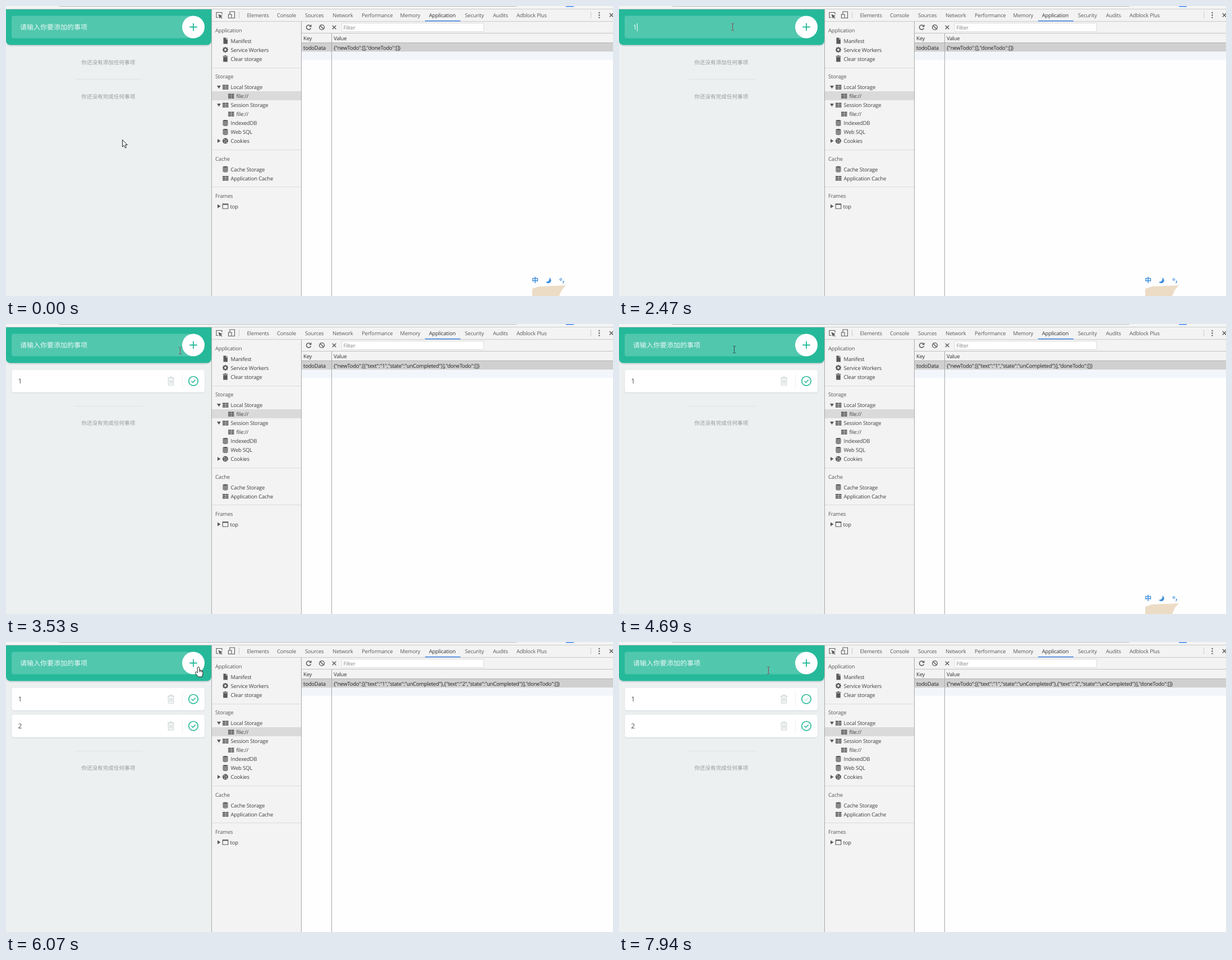
Write an HTML page with a canvas that moves like this. It is 1082x517 px and loops after 8 s.

```html
<!DOCTYPE html>
<html lang="zh">
<head>
<meta charset="utf-8">
<title>Todo</title>
<style>
html, body { margin: 0; width: 100%; height: 100%; overflow: hidden; background: #fff; }
canvas { display: block; width: 1082px; height: 517px; }
</style>
</head>
<body>
<canvas id="stage"></canvas>
<script>
const W = 1082, H = 517, LOOP = 8000;
const TEAL = '#25b99a', ICON = '#5a5a5a', LINE = '#a8a8a8', PANEL = '#f3f3f3';
const UI = '"Open Sans", "Noto Sans", sans-serif';
const CJK = '"Noto Sans CJK SC", "Noto Sans CJK", sans-serif';

const canvas = document.getElementById('stage');
const dpr = window.devicePixelRatio || 1;
canvas.width = W * dpr;
canvas.height = H * dpr;
const c = canvas.getContext('2d');
c.scale(dpr, dpr);

function rect(x, y, w, h, color) {
  c.fillStyle = color;
  c.fillRect(x, y, w, h);
}

function round(x, y, w, h, r, color) {
  c.beginPath();
  c.roundRect(x, y, w, h, r);
  c.fillStyle = color;
  c.fill();
}

function disc(x, y, r, color) {
  c.beginPath();
  c.arc(x, y, r, 0, 7);
  c.fillStyle = color;
  c.fill();
}

function ring(x, y, r, color, width) {
  c.beginPath();
  c.arc(x, y, r, 0, 7);
  stroke(color, width);
}

function stroke(color, width) {
  c.strokeStyle = color;
  c.lineWidth = width;
  c.stroke();
}

// Draws an SVG path whose origin sits at x, y.
function path(x, y, d, color, width, fill) {
  const p = new Path2D(d);
  c.save();
  c.translate(x, y);
  if (fill) {
    c.fillStyle = fill;
    c.fill(p);
  }
  if (width) {
    c.strokeStyle = color;
    c.lineWidth = width;
    c.stroke(p);
  }
  c.restore();
}

function label(str, x, y, color = '#404040', font = '9.5px ' + UI, spacing = -0.2, align = 'left') {
  c.font = font;
  c.letterSpacing = spacing + 'px';
  c.textRendering = 'geometricPrecision';
  c.textAlign = align;
  c.textBaseline = 'alphabetic';
  c.fillStyle = color;
  c.fillText(str, x, y);
}

function shadow(color, blur, dy, draw) {
  c.save();
  c.shadowColor = color;
  c.shadowBlur = blur * dpr;
  c.shadowOffsetY = dy * dpr;
  draw();
  c.restore();
}

// ---- Cursor: stepped moves [start, end, steps, x, y]
const START = [207, 238];
const MOVES = [
  [120, 390, 3, 232, 311],
  [670, 1210, 5, 148, 33],
  [2330, 3120, 7, 336, 48],
  [3530, 4130, 5, 205, 45],
  [5090, 6070, 7, 343, 44],
  [6940, 7210, 3, 276, 108],
  [7360, 7650, 3, 334, 103],
  [7800, 7940, 2, 266, 50]
];

function cursorAt(t) {
  let [x, y] = START;
  for (const [t0, t1, n, tx, ty] of MOVES) {
    if (t < t0) break;
    const done = Math.floor((t - t0) / (t1 - t0) * (n - 1) + 1e-6) + 1;
    const k = Math.min(1, done / n);
    x += (tx - x) * k;
    y += (ty - y) * k;
  }
  return [x, y];
}

function drawCursor(t) {
  const [x, y] = cursorAt(t);
  const onAdd = Math.hypot(x - 334, y - 38) < 20;
  const onCheck = t > 6940 && Math.hypot(x - 334, y - 102) < 12;
  if (onAdd || onCheck) {
    path(x, y, 'M-1.8 1.5Q0-1 1.8 1.5V6L4 6.3 6.3 7.2 8 8.8V13L6.4 18H-.6L-5.4 11.6Q-6 8.2-3.8 9.2L-1.8 11ZM1.8 6V9.5M4 6.3V9.5M6.3 7.2V9.8', '#222', 1, '#fff');
  } else if (y < 57 && x < 340) {
    const color = t > 4000 && t < 5000 ? '#2d4a45' : '#8d4a58';
    path(Math.round(x) + 0.5, Math.round(y) + 0.5, 'M-2.5-6H-.8L0-5.4 .8-6H2.5M0-5.4V5.4M-2.5 6H-.8L0 5.4 .8 6H2.5', color, 1);
  } else {
    path(x, y, 'M.5 .5V13L3.3 10.3 5.4 15 7.5 14.1 5.5 9.5H9.3Z', '#222', 1, '#fff');
  }
}

// ---- State
const within = (t, a, b) => t >= a && t < b;

function stateAt(t) {
  const items = t < 3250 ? [] : t < 6070 ? ['1'] : ['1', '2'];
  return {
    items,
    typed: within(t, 2330, 3250) ? '1' : within(t, 5090, 6070) ? '2' : '',
    caret: [[390, 940], [1490, 1920], [2330, 2850], [4130, 4690], [5090, 5580]]
      .some(([a, b]) => within(t, a, b)),
    ime: t < 3110 || within(t, 4130, 5900),
    focused: within(t, 7210, 7650),
    hover: within(t, 7650, 7800) ? 1 : within(t, 7800, 7940) ? 0.5 : 0,
    fading: t >= 7650
  };
}

// ---- Todo page
function trash(x, y) {
  path(x, y, 'M-6-5H6M-2.3-5V-7.3H2.3V-5M-4.7-5V7.3H4.7V-5M-2.2-2.5V5M0-2.5V5M2.2-2.5V5', '#c3cecd', 1);
}

function check(x, y, fill, pale) {
  c.globalAlpha = fill;
  disc(x, y, 8.2, TEAL);
  c.globalAlpha = 1;
  ring(x, y, 8.2, TEAL, 1.7);
  path(x, y, 'M-3.4 .1L-1 2.5 3.6-2.1', fill ? '#fff' : pale ? '#c5e9e1' : TEAL, 1.5);
}

function drawItem(str, y, focused, hover, pale) {
  const d = focused ? 1 : 0;
  const h = 40 + d * 1.5;
  shadow(focused ? 'rgba(70,140,205,.8)' : 'rgba(44,62,80,.13)', focused ? 4 : 3, 1 - d,
    () => round(10.5, y, 343.5, h, 4, '#fff'));
  if (focused) {
    c.beginPath();
    c.roundRect(10.5, y + 0.5, 343, h - 1, 3);
    stroke('#94bfe2', 1);
  }
  const mid = y + h / 2;
  label(str, 21.5 + d, mid + 4.3, '#494949', '12px ' + UI, 0);
  trash(294 - d, mid);
  rect(314 - d, mid - 13, 1, 26, '#edf0f1');
  check(334 - d, mid, hover, pale);
}

function drawTodo(s) {
  rect(0, 6, 366, H - 6, '#edf0f1');
  shadow('rgba(44,62,80,.2)', 3, 1.5, () => round(0, 6, 366, 63.5, [0, 0, 8, 8], TEAL));
  round(10, 17.5, 340, 40, [4, 20, 20, 4], 'rgba(255,255,255,.2)');
  disc(334, 37.5, 20, '#fff');
  path(334, 37.5, 'M-6.7 0H6.7M0-6.7V6.7', TEAL, 1.8);

  if (s.typed) label(s.typed, 25, 42.2, '#fff', '12px ' + UI, 0);
  else label('请输入你要添加的事项', 25, 42.4, 'rgba(255,255,255,.88)', '12px ' + CJK, 0);
  if (s.caret) rect(s.typed ? 32 : 25, 31, 1, 14, '#fff');

  const hint = (str, y) => label(str, 182.3, y + 3.6, '#999b99', '9.6px ' + CJK, 0, 'center');
  const n = s.items.length;
  const shift = s.focused ? 1.5 : 0;
  s.items.forEach((str, i) => drawItem(str, 81.7 + i * 48 + (i ? shift : 0),
    s.focused && !i, i ? 0 : s.hover, !i && s.fading));
  if (!n) hint('你还没有添加任何事项', 100.5);
  const bar = n ? 98 + n * 48 + shift : 130;
  rect(123, Math.round(bar), 120, 1, '#dee2e3');
  hint('你还没有完成任何事项', bar + (n ? 30.5 : 31));
}

// ---- Developer tools
const icons = {
  doc: (x, y) => path(x, y, 'M-3.5-5.5H1.2V-2.2H4V5.5H-3.5ZM2-5.5L4-3H2Z', '', 0, ICON),
  gear(x, y) {
    for (let i = 0; i < 8; i++) {
      const a = i * Math.PI / 4;
      disc(x + 4.2 * Math.cos(a), y + 4.2 * Math.sin(a), 1.1, ICON);
    }
    ring(x, y, 3, ICON, 2.2);
  },
  bin: (x, y) => path(x, y, 'M-4.5-5H-1.5V-6H1.5V-5H4.5V-3.8H-4.5ZM-3.8-3H3.8V5.5H-3.8Z', '', 0, ICON),
  grid(x, y) {
    for (let i = 0; i < 6; i++) rect(x - 5 + (i % 2) * 5.5, y - 4 + (i >> 1) * 3, 5, 2.3, ICON);
  },
  db(x, y) {
    path(x, y, 'M-4.6-3.6Q-4.6-5.4 0-5.4T4.6-3.6V3.6Q4.6 5.4 0 5.4T-4.6 3.6Z', '', 0, ICON);
    for (let i = 0; i < 3; i++) path(x, y - 2.9 + i * 2.6, 'M-4.6 0Q-3 1.2 0 1.2T4.6 0', PANEL, 0.8);
  },
  cookie(x, y) {
    disc(x, y, 5, ICON);
    [[-2, -2], [1.5, -1], [-1, 2], [2.5, 2.3], [4, -4]].forEach(([a, b]) => disc(x + a, y + b, 0.9, PANEL));
  },
  frame(x, y) {
    path(x, y, 'M-4.8-4H4.8V4.2H-4.8Z', ICON, 1.1);
    rect(x - 5, y - 4.5, 10, 2, ICON);
  }
};

const TABS = { Elements: 429.5, Console: 483, Sources: 533, Network: 582, Performance: 634, Memory: 702.5,
  Application: 754, Security: 818, Audits: 868, 'Adblock Plus': 910 };
const SECTIONS = { Application: 43, Storage: 125.5, Cache: 272, Frames: 338 };

// [text, y, icon, indent, arrow]
const TREE = [
  ['Manifest', 62, 'doc', 0], ['Service Workers', 78, 'gear', 0], ['Clear storage', 94, 'bin', 0],
  ['Local Storage', 144.5, 'grid', 0, 'down'], ['file://', 160.5, 'grid', 10],
  ['Session Storage', 176.5, 'grid', 0, 'down'], ['file://', 192.5, 'grid', 10],
  ['IndexedDB', 208.5, 'db', 0], ['Web SQL', 224.5, 'db', 0], ['Cookies', 240.5, 'cookie', 0, 'right'],
  ['Cache Storage', 291, 'db', 0], ['Application Cache', 307, 'grid', 0], ['top', 357, 'frame', -1, 'right']
];

const ARROWS = { down: 'M-3.5-2.5H3.5L0 3Z', right: 'M-2.5-3.5L3 0-2.5 3.5Z' };

function drawToolbar() {
  rect(0, 0, W, 5, '#f4f4f4');
  rect(95, 0, 815, 1, '#bcbcbc');
  rect(998, 0, 14, 1.5, '#4285f4');
  rect(366, 5, W - 366, H - 5, PANEL);
  rect(0, 5, W, 1, '#c9cccb');
  rect(366, 27, W - 366, 1, '#cacaca');

  path(380, 16, 'M5-1V-4.5H-5V4.5H-1.5', ICON, 1.1);
  path(380, 16, 'M-1.5-1.5L6 1.8 3 3 5.6 5.6 4.4 6.6 2 4.2 .8 6.6Z', '', 0, ICON);
  path(402, 16, 'M-3-1V-6H5.5V5.5H1M-5.5-1H0V5.5H-5.5Z', ICON, 1.1);
  rect(415, 10, 1, 12, '#ccc');
  for (const name in TABS) label(name, TABS[name], 20, name === 'Application' ? '#333' : ICON);
  rect(747, 25.8, 63, 1.6, '#4285e0');
  rect(1042, 10, 1, 12, '#ccc');
  for (const y of [12, 16.3, 20.6]) disc(1057.5, y, 1.2, ICON);
  path(1079, 16.3, 'M-3.2-3.2L3.2 3.2M3.2-3.2L-3.2 3.2', ICON, 1.4);
}

function drawSidebar() {
  rect(366, 6, 1, H, LINE);
  for (const y of [110, 256, 322]) rect(367, y, 159, 1, '#dcdcdc');
  rect(367, 152, 159, 16, '#dadada');
  for (const name in SECTIONS) label(name, 373, SECTIONS[name] + 3.5, ICON);
  for (const [str, y, icon, indent, arrow] of TREE) {
    icons[icon](391 + Math.max(indent, 0), y);
    label(str, 400.5 + indent, y + 3.5);
    if (arrow) path(379.5, y, ARROWS[arrow], '', 0, ICON);
  }
  rect(526, 28, 1, H, LINE);
}

function drawTable(items) {
  c.beginPath();
  c.arc(539.5, 38, 4, 0.3, 5.5);
  stroke(ICON, 1.5);
  path(539.5, 38, 'M5-5.2V-.8H.6Z', '', 0, ICON);
  ring(563, 38, 4.4, ICON, 1.4);
  path(563, 38, 'M-3-3L3 3', ICON, 1.4);
  path(585, 38, 'M-3.3-3.3L3.3 3.3M3.3-3.3L-3.3 3.3', ICON, 1.4);
  rect(598, 30, 254, 16, '#dcdcdc');
  rect(599, 31, 252, 14, '#fff');
  label('Filter', 601.5, 42, '#858585');

  rect(527, 48, W, 1, '#c0c0c0');
  rect(527, 65, W, 1, '#b4b4b4');
  rect(527, 66, W, H, '#fefefe');
  rect(527, 66, W, 15.5, '#d0d0d0');
  rect(527, 81.5, W, 14.5, '#f2f6fb');
  rect(580, 49, 1, H, LINE);
  label('Key', 530, 61, '#333');
  label('Value', 584, 61, '#333');
  label('todoData', 530, 78, '#222');
  const data = { newTodo: items.map(text => ({ text, state: 'unCompleted' })), doneTodo: [] };
  label(JSON.stringify(data), 584, 78, '#222', '9.5px ' + UI, -0.24);
}

function drawIme() {
  const blue = '#3d8fdd';
  path(938, 500, 'M0 4L12 0 60-2 53 6 48 17H0Z', '', 0, '#ecdcc6');
  label('中', 943.3, 493.4, blue, 'bold 12px ' + CJK, 0, 'center');
  path(967, 489, 'M2-5Q7 0 3 4-1 7-5 3 2 3 2-5Z', '', 0, blue);
  ring(989, 487.5, 1.7, blue, 1.1);
  path(993.5, 491, 'M-.8-1H1.1V1L-.5 4H-1.3L-.3 1.3H-.8Z', '', 0, blue);
}

function draw(t) {
  const s = stateAt(t);
  drawToolbar();
  drawTodo(s);
  drawSidebar();
  drawTable(s.items);
  if (s.ime) drawIme();
  drawCursor(t);
}

const begin = performance.now();
function tick() {
  draw((performance.now() - begin) % LOOP);
  requestAnimationFrame(tick);
}
tick();
</script>
</body>
</html>
```
